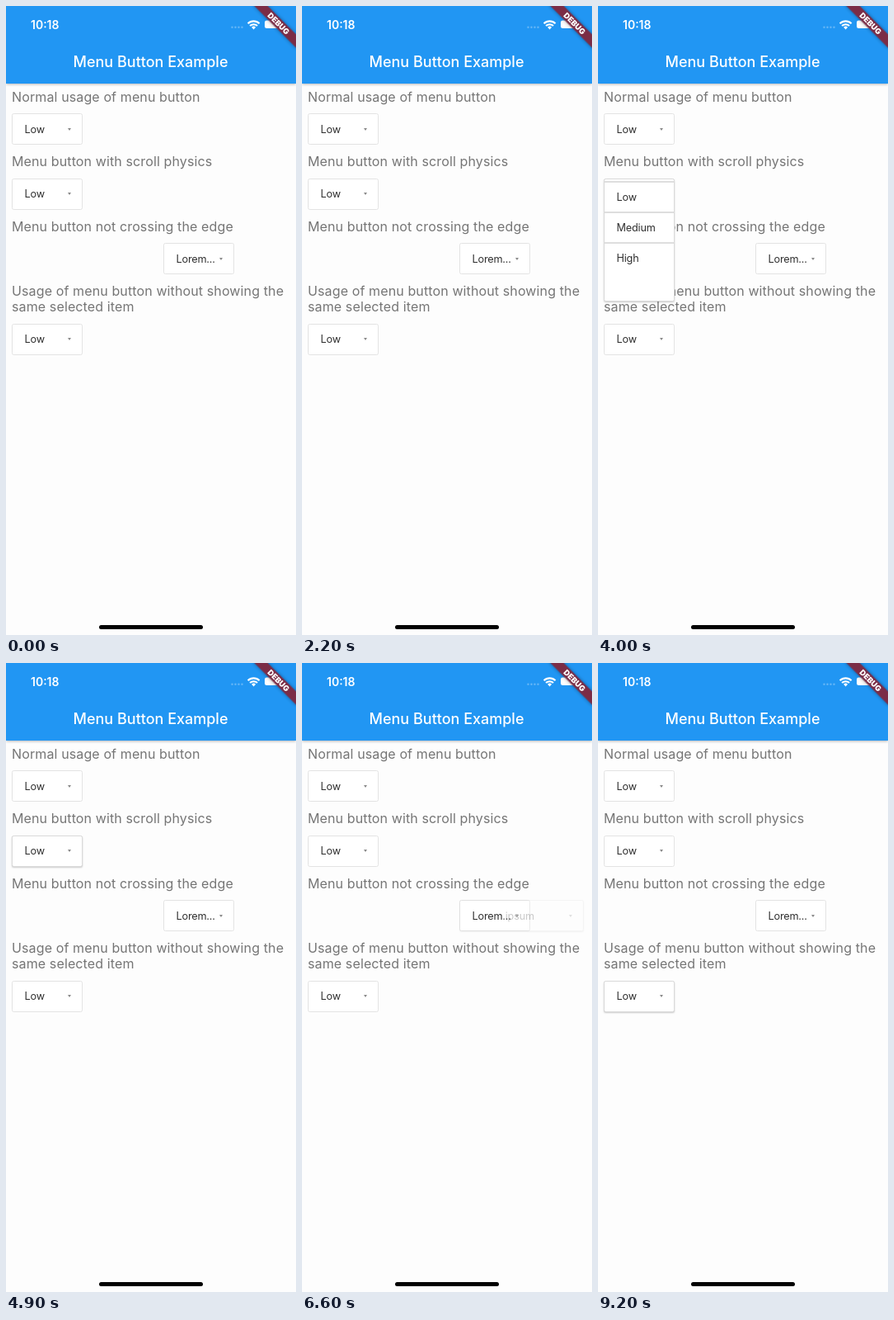
Animation of 352 by 762 pixels, one loop 9.3 s. Source, as an HTML page:

```html
<!DOCTYPE html>
<html lang="en">
<head>
<meta charset="utf-8">
<title>Menu Button Example</title>
<style>
  html, body { margin: 0; width: 100%; height: 100%; overflow: hidden; background: #fff; }
  body { font-family: Inter, "Open Sans", sans-serif; }
  #stage { position: relative; width: 352px; height: 762px; overflow: hidden; background: #fdfdfd; }
  #stage > * { position: absolute; }
  .bar {
    left: 0; top: 0; width: 352px; height: 94px; background: #2196f3;
    box-shadow: 0 1px 3px rgba(0, 0, 0, .28);
  }
  .time { left: 30px; top: 13px; font: 600 14px/20px Inter, sans-serif; color: #fff; }
  .title {
    left: 0; top: 56px; width: 351px; text-align: center;
    font: 500 18px/24px Inter, sans-serif; color: #fff;
  }
  .label {
    left: 7px; white-space: pre; color: #757575;
    font-size: 16px; line-height: 19px; letter-spacing: .12px;
  }
  .box {
    box-sizing: border-box; height: 38px; overflow: hidden; background: #fff;
    border: 1px solid #e3e3e3; border-radius: 2.5px;
  }
  .panel { opacity: 0; box-shadow: 0 1px 2px rgba(0, 0, 0, .2); border-color: #dadada; }
  .list { margin-top: -.5px; }
  .row {
    position: relative; box-sizing: border-box; height: 37px; padding-left: 14.5px;
    font-size: 12.7px; line-height: 37px; letter-spacing: -.2px; color: #303030; white-space: nowrap;
  }
  .row + .row { border-top: 1px solid #bdbdbd; line-height: 35.5px; }
  .arrow {
    position: absolute; right: 13.5px; top: 17px;
    border: solid transparent; border-width: 3.5px 2.5px 0; border-top-color: #8a8a8a;
  }
  .home { left: 113px; top: 750px; width: 126px; height: 5px; border-radius: 3px; background: #000; }
  .art { left: 0; top: 0; }
</style>
</head>
<body>
<div id="stage">
  <div class="bar"></div>
  <div class="time">10:18</div>
  <div class="title">Menu Button Example</div>

  <div class="label" style="top:100.5px">Normal usage of menu button</div>
  <div class="label" style="top:179px">Menu button with scroll physics</div>
  <div class="label" style="top:257.5px">Menu button not crossing the edge</div>
  <div class="label" style="top:336px">Usage of menu button without showing the
same selected item</div>

  <div class="home"></div>

  <svg class="art" width="352" height="93" viewBox="0 0 352 93">
    <g fill="#fff" opacity=".3">
      <circle cx="274.5" cy="25.8" r="1.2"/><circle cx="278.5" cy="25.8" r="1.2"/>
      <circle cx="282.5" cy="25.8" r="1.2"/><circle cx="286.5" cy="25.8" r="1.2"/>
    </g>
    <g fill="none" stroke="#fff" stroke-width="2.1">
      <path d="M293.6 21.2a10 10 0 0 1 14 0"/>
      <path d="M296.1 24.1a6.4 6.4 0 0 1 9 0"/>
    </g>
    <path d="M300.6 28.4l-2.5-2.6a3.6 3.6 0 0 1 5 0z" fill="#fff"/>
    <rect x="314" y="17.5" width="20" height="9.6" rx="2.4" fill="#fff"/>
    <rect x="335" y="20.5" width="1.6" height="3.6" rx=".8" fill="#fff" opacity=".6"/>
    <g transform="translate(352 0) rotate(45)">
      <rect x="-37.6" y="24.3" width="75.2" height="11.3" fill="#7b2c46"
            style="filter:drop-shadow(0 0 2px rgba(0,0,0,.4))"/>
      <text x="0" y="33.4" text-anchor="middle" fill="#fff"
            font-family="Inter, sans-serif" font-size="9.4" font-weight="900">DEBUG</text>
    </g>
  </svg>
</div>

<script>
  const LOOP = 9300, STEP = 100, CLOSED = 38, ROW = 37;
  const stage = document.getElementById('stage');
  const levels = ['Low', 'Medium', 'High'];
  const menus = [
    { x: 7, y: 130, text: 'Low', items: levels, open: [400, 700], close: [1500, 1800] },
    { x: 7, y: 208.5, text: 'Low', items: levels, open: [2300, 2600], close: [4600, 4900],
      scroll: [[2800, 0], [3200, 28], [3600, 0], [4000, -33.5], [4400, 0]] },
    { x: 191, y: 287, text: 'Lorem...', full: 'Lorem ipsum', wide: 151, fade: true,
      items: ['Lorem ipsum', 'dolor sit amet', 'consectetur'],
      open: [5200, 5500], close: [6200, 6500] },
    { x: 7, y: 384.5, text: 'Low', items: levels.slice(1), open: [7200, 7500], close: [8900, 9200] }
  ];
  const anims = [];

  function play(el, keys) {
    const frames = keys.map(([t, props]) => ({ offset: t / LOOP, easing: 'ease-in-out', ...props }));
    const anim = el.animate(frames, { duration: LOOP, iterations: Infinity });
    anim.pause();
    anims.push(anim);
  }

  function addBox(menu, rows, width, kind) {
    const el = document.createElement('div');
    el.className = 'box ' + kind;
    Object.assign(el.style, { left: menu.x + 'px', top: menu.y + 'px', width: width + 'px' });
    const html = rows.map((s, i) =>
      `<div class="row">${s}${i ? '' : '<i class="arrow"></i>'}</div>`).join('');
    el.innerHTML = `<div class="list">${html}</div>`;
    stage.append(el);
    return el;
  }

  for (const menu of menus) addBox(menu, [menu.text], 86, '');

  for (const menu of menus) {
    const rows = [menu.full || menu.text, ...menu.items];
    const panel = addBox(menu, rows, menu.wide || 86, 'panel');
    const shut = CLOSED + 'px', tall = rows.length * ROW + 1 + 'px';
    const [o0, o1] = menu.open, [c0, c1] = menu.close;

    play(panel, [
      [0, { height: shut }], [o0, { height: shut }], [o1, { height: tall }],
      [c0, { height: tall }], [c1, { height: shut }], [LOOP, { height: shut }]
    ]);

    // Opacity jumps fall between steps, so each step sees one clear value.
    const hide = c1 + STEP / 2, dim = menu.fade ? .25 : 0;
    play(panel, [
      [0, { opacity: 0 }], [o0 + 1, { opacity: 0 }], [o0 + 1, { opacity: 1 }],
      [hide, { opacity: 1 }], [hide, { opacity: dim }],
      [hide + STEP / 2, { opacity: dim }], [hide + STEP / 2 + 1, { opacity: 0 }],
      [LOOP, { opacity: 0 }]
    ].filter(([t]) => t <= LOOP));

    if (menu.scroll) {
      const shift = y => ({ transform: `translateY(${y}px)` });
      play(panel.firstChild, [
        [0, shift(0)], ...menu.scroll.map(([t, y]) => [t, shift(y)]), [LOOP, shift(0)]
      ]);
    }
  }

  function draw() {
    const t = Math.floor(performance.now() % LOOP / STEP) * STEP;
    for (const anim of anims) anim.currentTime = t;
    requestAnimationFrame(draw);
  }
  draw();
</script>
</body>
</html>
```
